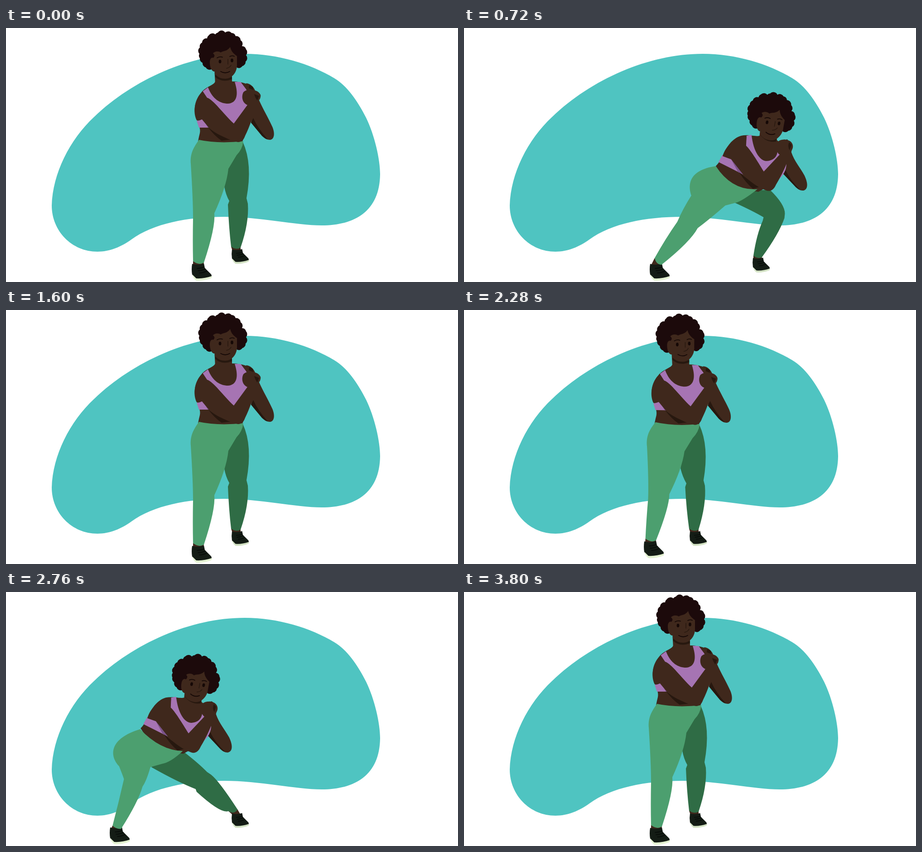
Recreate the animation shown at these times as an HTML page with a canvas. Size 998x561 px, loop 3.84 s.

```html
<!DOCTYPE html>
<html lang="en">
<head>
<meta charset="utf-8">
<title>Side lunges</title>
<style>
html, body { margin: 0; width: 100%; height: 100%; overflow: hidden; background: #fff; }
canvas { display: block; width: 998px; height: 561px; }
</style>
</head>
<body>
<canvas id="stage"></canvas>
<script>
const W = 998, H = 561, LOOP = 3840, HALF = 1920, STEP = 40;
const OUT = { start: 316, time: 544 }, BACK = { start: 1112, time: 470 };

const SKIN = '#3f281c', SHADE = '#27180f', HAIR = '#1c0a0b', INK = '#150806';
const BRA = '#a674b3', BRA_SHADE = '#7b5489', PANTS = '#4c9f6f', PANTS_FAR = '#2f6c45';
const TEAL = '#4fc4c1', SHOE = '#141c15', LACE = '#060a07';

const canvas = document.getElementById('stage');
const ctx = canvas.getContext('2d');
const ratio = window.devicePixelRatio || 1;
canvas.width = W * ratio;
canvas.height = H * ratio;

const clamp = x => Math.max(0, Math.min(1, x));
const ease = x => (1 - Math.cos(Math.PI * clamp(x))) / 2;

// Splits a path into commands and numbers, moved by (-dx, -dy).
function parse(path, dx = 0, dy = 0) {
  let n = 0;
  return path.match(/[A-Z]|-?[\d.]+/g).map(k => /[A-Z]/.test(k) ? k : k - (n++ % 2 ? dy : dx));
}

// Blends keyed poses; runs on past the last key.
function blend(keys, at, e) {
  let i = 0;
  while (i < at.length - 2 && e > at[i + 1]) i++;
  const t = (e - at[i]) / (at[i + 1] - at[i]);
  return keys[i].map((a, k) => typeof a === 'string' ? a : a + (keys[i + 1][k] - a) * t);
}

// Moves selected points of a pose by a weighted offset.
function drag(pose, weights, [dx, dy]) {
  let n = 0;
  return pose.map(k => {
    if (typeof k === 'string') return k;
    const w = weights[n >> 1] || 0;
    return k + w * (n++ % 2 ? dy : dx);
  });
}

function fill(path, color) {
  ctx.fillStyle = color;
  ctx.fill(new Path2D(Array.isArray(path) ? path.join(' ') : path));
}
function line(path, color, width) {
  ctx.strokeStyle = color;
  ctx.lineWidth = width;
  ctx.lineCap = 'round';
  ctx.stroke(new Path2D(path));
}
function shifted([dx, dy], draw) {
  ctx.save();
  ctx.translate(dx, dy);
  draw();
  ctx.restore();
}

// Upper body: upright, half lean, deep lean; stored relative to the head.
const LEAN = [0, 1, 2];
const TILT = [[0], [0.12], [0.18]];
const upper = (a, b, c) => [parse(a), parse(b, -39, 61), parse(c, 201, 136)];

const neck = upper(
  'M460 90 L462 124 L499 122 L499 95 Z',
  'M414 155 L414 178 L455 182 L454 155 Z',
  'M654 225 L652 246 L691 252 L691 228 Z');
const neckShade = upper(
  'M462 103 Q474 113 499 108 L499 113 Q477 122 462 108 Z',
  'M416 162 Q428 174 453 172 L453 177 Q430 182 415 167 Z',
  'M656 232 Q668 246 690 245 L689 251 Q668 254 655 237 Z');
const torso = upper(
  'M462 118 C460 126 440 130 432 142 C418 156 412 180 421 200 C425 212 430 222 428 232 Q426 240 424 250 L470 260 L520 255 Q545 200 545 160 C545 140 540 126 530 123 Q515 118 499 118 Z',
  'M415 168 C410 176 392 173 380 178 C362 186 350 202 347 232 C345 245 344 252 342 258 Q338 264 336 269 L372 302 L435 300 Q478 265 485 235 C486 210 480 190 470 183 Q460 178 452 176 Z',
  'M656 236 C651 243 630 234 612 238 C592 244 580 262 571 284 C568 291 565 294 562 298 Q559 302 556 305 L585 350 L650 362 Q705 335 711 298 C712 280 706 262 700 254 Q692 250 690 246 Z');
const top_ = upper(
  'M434 140 L446 131 C456 158 474 167 490 167 C508 166 515 150 505 119 L518 119 L530 135 L545 165 Q545 185 530 200 L503 214 L440 158 Z',
  'M384 178 L397 175 C401 206 416 224 435 224 C450 223 462 210 457 182 L467 184 L480 200 L486 235 Q485 250 474 263 L436 262 L386 204 Z',
  'M624 238 L635 236 C639 272 653 294 669 294 C685 293 697 282 691 258 L698 262 L708 275 L712 298 Q713 321 691 338 L662 320 L622 262 Z');
const band = upper(
  'M421 205 Q429 204 435 201 L453 220 L426 220 Z',
  'M346 235 Q355 237 364 236 L385 262 L342 249 Z',
  'M571 280 Q580 287 590 289 L617 324 L562 296 Z');
const bandShade = upper(
  'M435 202 L453 220 L446 220 Z',
  'M364 237 L385 262 L378 260 Z',
  'M590 290 L617 324 L605 318 Z');
const armShade = upper(
  'M446 219 Q470 240 500 246 L476 249 Q460 238 446 219 Z',
  'M384 262 Q405 280 434 291 L416 295 Q400 284 384 262 Z',
  'M608 319 Q630 338 652 351 L638 355 Q622 342 608 319 Z');
const farArm = upper(
  'M530 122 C540 122 548 132 550 138 C558 140 564 147 562 152 C561 158 559 158 559 160 C568 180 580 200 588 218 C594 232 593 246 583 247 C575 247 570 243 565 238 L541 209 L545 165 Z',
  'M466 183 C474 178 485 182 490 187 C496 190 496 198 494 204 C491 208 490 209 490 211 C498 232 510 246 520 265 C528 282 528 296 517 298 C511 299 505 295 500 290 L473 261 L485 225 Z',
  'M694 256 C698 246 710 244 720 250 C728 256 727 264 725 268 C723 272 723 273 723 275 C730 295 742 308 752 326 C760 343 760 356 750 359 C744 360 738 357 733 352 L705 322 L714 290 Z');
const farArmShade = upper(
  'M541 209 L546 199 Q556 222 578 246 Q570 243 565 238 Z',
  'M473 261 L478 254 Q488 275 512 297 Q505 295 500 290 Z',
  'M705 322 L710 314 Q720 336 743 358 Q738 356 733 352 Z');
const nearArm = upper(
  'M434 139 L444 154 C458 158 480 190 503 211 L533 170 C522 166 519 152 524 142 C530 135 546 134 552 141 C558 147 554 158 551 168 C548 190 538 218 528 238 C524 250 516 254 508 251 C484 245 462 230 447 219 L432 201 L421 204 C412 185 416 160 434 139 Z',
  'M384 180 L388 199 C398 208 418 234 436 257 L467 218 C458 214 456 198 462 191 C470 186 484 188 488 194 C492 200 490 208 488 215 C486 235 472 262 461 285 C456 297 448 301 440 298 C420 290 400 278 384 262 L364 237 L346 236 C348 210 358 188 384 180 Z',
  'M624 240 L623 260 C632 268 648 294 662 317 L697 280 C689 274 688 260 693 251 C701 244 716 246 722 252 C727 258 724 266 721 274 C716 295 702 325 689 346 C684 358 676 362 668 359 C648 352 630 338 616 323 L590 290 L571 283 C578 262 592 246 624 240 Z');
const fingers = upper(
  'M548 146 L559 150 L555 160 Q550 154 548 146 Z',
  'M488 194 L494 197 L490 209 Q486 202 488 194 Z',
  'M718 252 L723 258 L719 270 Q714 262 718 252 Z');
const knuckles = upper(
  'M537 126 L545 130 L546 137 L536 133 Z',
  'M472 180 L477 182 L480 186 L470 184 Z',
  'M712 246 L715 247 L715 248 L712 247 Z');

// Legs: upright first, then two depths of lunge for each side.
const nearUp = parse('M426 247 Q468 256 524 250 Q522 268 509 281 L491 311 Q487 350 460 409 Q463 440 437 518 Q427 525 413 515 Q412 470 413 420 Q413 380 408 300 C406 275 416 262 426 247 Z');
const farUp = parse('M497 250 L523 252 Q545 300 531 376 L534 388 Q537 430 518 485 Q509 491 497 483 Q492 440 490 390 L493 382 Q485 368 482 350 Z');

const right = {
  at: [0, 0.589, 0.846],
  head: [[0, 0], [145, 81], [201, 136]],
  lean: [[0], [1.27], [2]],
  foot: [[0, 0], [133, 13], [140, 19]],
  plant: [139, 19],
  near: [nearUp,
    parse('M515 278 Q558 314 613 312 Q596 338 578 346 L565 352 Q530 400 501 427 Q490 465 437 523 Q424 524 418 510 Q437 460 455 418 Q472 380 476 352 C461 325 461 290 515 278 Z'),
    parse('M556 305 Q592 360 648 356 Q615 382 600 386 L577 392 Q545 420 516 442 Q500 472 436 523 Q424 522 421 508 Q445 465 471 428 Q484 398 502 370 C494 345 497 314 556 305 Z')],
  far: [farUp,
    parse('M610 312 L635 311 Q661 365 662 400 L661 408 Q660 445 650 500 Q640 506 629 499 Q620 455 618 412 L617 402 Q595 375 572 348 Z'),
    parse('M640 358 L676 358 Q709 390 709 410 L708 420 Q696 455 659 506 Q650 511 640 503 Q647 455 660 426 L662 418 Q640 405 596 385 Z')]
};
const left = {
  at: [0, 0.42, 0.717],
  head: [[0, 0], [-39, 61], [-49, 97]],
  lean: [[0], [1], [1.5]],
  foot: [[0, 0], [-179, -13], [-180, -2]],
  plant: [-181, -1],
  near: [nearUp,
    parse('M337 268 Q375 295 435 297 Q418 322 397 333 L381 346 Q376 410 350 447 Q325 478 260 515 Q249 514 247 500 Q276 458 309 419 Q313 380 306 346 C286 328 286 285 337 268 Z'),
    parse('M316 286 Q357 323 412 325 Q390 350 370 357 L349 367 Q342 415 325 440 Q308 474 257 524 Q246 524 241 513 Q262 465 284 418 Q285 395 277 366 C256 345 256 305 316 286 Z')],
  far: [farUp,
    parse('M420 300 L436 298 Q462 335 475 384 L480 388 Q494 410 515 484 Q505 492 497 484 Q465 440 448 416 L442 408 Q420 382 379 346 Z'),
    parse('M400 325 L412 325 Q444 358 459 391 L466 396 Q482 414 513 482 Q505 492 494 484 Q470 466 434 429 L430 422 Q400 402 349 367 Z')]
};
const NEAR_PULL = [0, 0, 0, 0, 0, 0, .2, .4, .7, 1, 1, 1, .7, .4, .2];
const FAR_PULL = [0, 0, .2, .4, .4, .7, 1, 1, 1, .7, .4, .4, .2];

const blob = 'M527 57 C600 57 672 79 725 111 C752 127 776 160 795 198 C814 237 826 290 826 323 C825 405 770 436 697 436 C640 436 560 417 482 417 C400 417 325 432 277 467 C255 483 229 494 202 494 C145 494 101 448 101 392 C103 322 140 247 195 196 C281 114 407 57 527 57 Z';

const curls = [[454, 91], [441, 87], [434, 77], [428, 67], [427, 57], [428, 43], [433, 32], [444, 23],
  [448, 16], [462, 14], [468, 10], [484, 10], [498, 11], [507, 18], [518, 27], [521, 40], [530, 47],
  [530, 60], [529, 74], [522, 84], [511, 88]];
const hair = 'M460 96' + curls.map(p => ' A9.5 9.5 0 0 1 ' + p.join(' ')).join('') + ' L480 60 Z';
const face = 'M458 66 C453 64 450 69 450 76 C450 88 455 97 461 96 L463 103 Q470 112 484 112 C500 112 511 96 510 80 L510 62 C504 58 497 52 495 42 C488 52 480 50 474 54 C468 50 460 52 457 56 Q463 60 458 66 Z';

function drawHead(tilt) {
  ctx.translate(479, 50);
  ctx.rotate(tilt);
  ctx.translate(-479, -50);
  fill(hair, HAIR);
  fill(face, SKIN);
  line('M490 69 L490 80 M487 89 Q494 88 497 82', SHADE, 1.4);
  line('M466 66 Q472 62 478 64.5 M494 63 Q499 60 504 62.5', INK, 1.8);
  line('M474 96 Q484 102 494 96', INK, 1.8);
  for (const [x, y] of [[472.5, 74], [499, 71.7]]) {
    ctx.fillStyle = INK;
    ctx.beginPath();
    ctx.ellipse(x, y, 2.9, 4.1, 0, 0, 7);
    ctx.fill();
  }
}

function drawShoe(x, y, scale, sole) {
  ctx.save();
  ctx.translate(x, y);
  ctx.scale(scale, scale);
  fill('M0 0 Q13 4 26 -1 L28 9 L42 23 Q45 28 40 31 L10 35 L0 24 Q-2 12 0 0 Z', SHOE);
  fill('M0 23 L9 32 Q26 33 43 27 Q45 30 41 32 Q26 38 9 37 Q2 32 0 23 Z', sole);
  line('M11 10 Q19 10 26 7 M13 15 Q21 15 29 11 M16 20 Q24 20 32 16', LACE, 1.6);
  ctx.restore();
}

// Skin between the shoe and the trouser hem.
function drawAnkle(leg, first, x, y, width) {
  const pts = leg.filter(k => typeof k === 'number');
  const [hx, hy] = pts.slice(first * 2), [ix, iy] = pts.slice(first * 2 + 4);
  fill(`M${x} ${y} L${x + width} ${y} L${hx} ${hy} L${ix} ${iy} Z`, SKIN);
}

// Depth of the lunge and offset of the stepping foot.
function motion(u, plant) {
  let e, step, lift;
  if (u < BACK.start) {
    const p = clamp((u - OUT.start) / OUT.time);
    e = ease(p);
    step = ease(p / 0.47);
    lift = 22 * Math.sin(Math.PI * clamp(p / 0.55));
  } else {
    const p = clamp((u - BACK.start) / BACK.time);
    const q = clamp((p - 0.35) / 0.65);
    e = 1 - ease(p);
    step = 1 - ease(q);
    lift = 12 * Math.sin(Math.PI * q);
  }
  return { e, foot: [plant[0] * step, plant[1] * step - lift] };
}

function draw(time) {
  const side = time < HALF ? right : left;
  const { e, foot } = motion(time % HALF, side.plant);
  const pose = keys => blend(keys, side.at, e);
  const head = pose(side.head);
  const [lean] = pose(side.lean);
  const [tilt] = blend(TILT, LEAN, lean);
  const keyed = pose(side.foot);
  const slip = [foot[0] - keyed[0], foot[1] - keyed[1]];
  const still = [0, 0];
  const [nearFoot, farFoot] = side === left ? [foot, still] : [still, foot];
  const near = drag(pose(side.near), NEAR_PULL, side === left ? slip : still);
  const far = drag(pose(side.far), FAR_PULL, side === left ? still : slip);
  const body = (keys, color) => shifted(head, () => fill(blend(keys, LEAN, lean), color));

  ctx.setTransform(ratio, 0, 0, ratio, 0, 0);
  ctx.fillStyle = '#fff';
  ctx.fillRect(0, 0, W, H);
  fill(blob, TEAL);

  drawAnkle(far, 6, farFoot[0] + 500, farFoot[1] + 492, 18);
  drawShoe(farFoot[0] + 499, farFoot[1] + 489, 0.86, '#d3e2c4');
  fill(far, PANTS_FAR);

  body(farArm, SKIN);
  body(farArmShade, SHADE);
  body(torso, SKIN);
  body(neck, SKIN);
  body(neckShade, SHADE);
  body(top_, BRA);
  body(band, BRA);
  body(bandShade, BRA_SHADE);

  drawAnkle(near, 9, nearFoot[0] + 413, nearFoot[1] + 524, 22);
  drawShoe(nearFoot[0] + 411, nearFoot[1] + 521, 1, '#e4f2d2');
  fill(near, PANTS);

  body(armShade, SHADE);
  body(knuckles, SHADE);
  body(nearArm, SKIN);
  body(fingers, SHADE);
  shifted(head, () => drawHead(tilt));
}

function tick() {
  const t = performance.now() % LOOP;
  draw(Math.floor(t / STEP) * STEP);
  requestAnimationFrame(tick);
}
tick();
</script>
</body>
</html>
```
